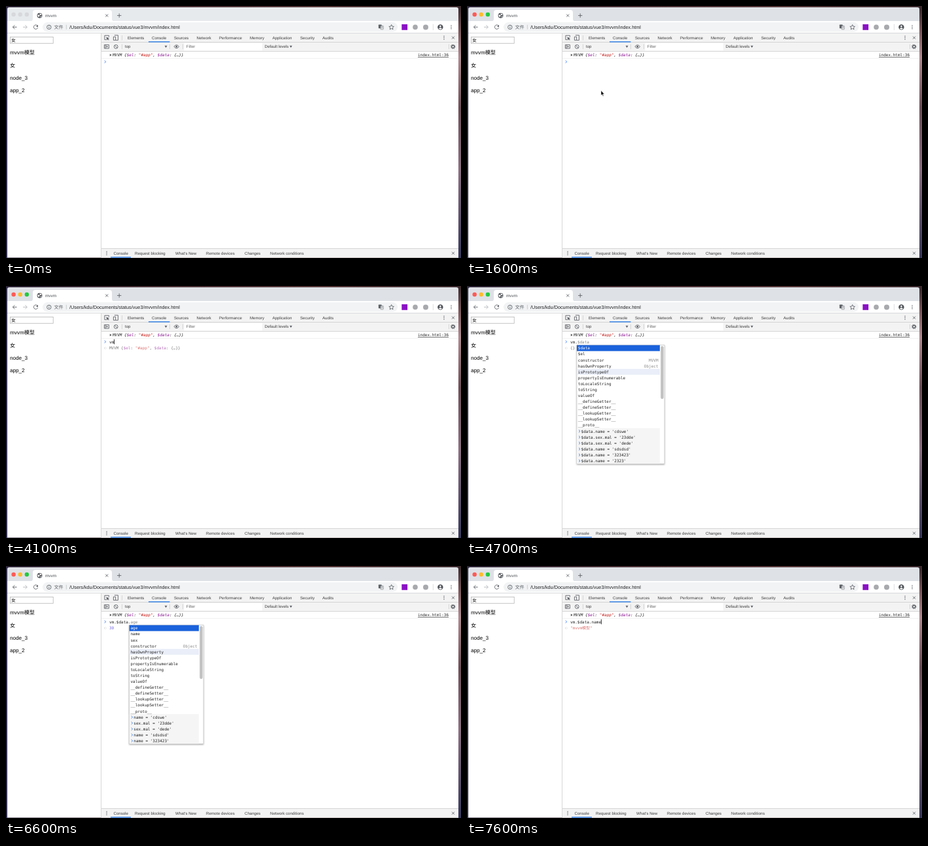
Write an HTML page that moves like this. It is 696 by 386 pixels and loops after 8000 ms.

```html
<!DOCTYPE html>
<html lang="en">
<head>
<meta charset="utf-8">
<title>mvvm</title>
<style>
html, body { margin: 0; width: 100%; height: 100%; overflow: hidden; background: #fff; }
svg { display: block; width: 696px; height: 386px; }
text { font-family: "Liberation Sans", "Noto Sans CJK SC", "Noto Sans CJK", sans-serif; text-rendering: geometricPrecision; white-space: pre; }
.ui text { font-size: 6.1px; fill: #3c3c3c; }
.code text { font-family: "DejaVu Sans Mono", "Noto Sans CJK SC", "Noto Sans CJK", monospace; font-size: 6.03px; fill: #222; }
.page text { font-size: 8.15px; fill: #000; }
.ime text { font-size: 6.1px; fill: #333; }
.line { fill: none; stroke: #5f6368; stroke-width: .9; }
.key { fill: #881391; }
.str { fill: #c41a16; }
.num { fill: #1c00cf; }
.window:not(.active) .strip { fill: #e7eaed; }
.window:not(.active) .light { fill: #d6d8dc; }
</style>
</head>
<body>
<svg viewBox="0 0 696 386">
  <defs>
    <linearGradient id="wallTop">
      <stop offset="0" stop-color="#2b2436"/><stop offset=".3" stop-color="#4a3238"/>
      <stop offset=".7" stop-color="#5a3a3c"/><stop offset="1" stop-color="#3b2a2e"/>
    </linearGradient>
    <linearGradient id="wallSide" x2="0" y2="1">
      <stop offset="0" stop-color="#3b2a2e"/><stop offset=".1" stop-color="#7d5a5e"/>
      <stop offset=".2" stop-color="#b08a90"/><stop offset=".4" stop-color="#6d4f58"/>
      <stop offset=".65" stop-color="#8a6f80"/><stop offset="1" stop-color="#38385a"/>
    </linearGradient>
    <filter id="shadow" x="-10%" y="-10%" width="120%" height="120%">
      <feDropShadow dx="0" dy="1" stdDeviation="1.3" flood-opacity=".4"/>
    </filter>
    <g id="dots" fill="#5f6368"><circle cy="-2.4" r=".75"/><circle r=".75"/><circle cy="2.4" r=".75"/></g>
    <path id="cross" class="line" d="M-2-2 2 2M2-2-2 2"/>
  </defs>

  <rect width="696" height="386" fill="url(#wallTop)"/>
  <rect y="2" width="3" height="384" fill="#33304e"/>
  <rect x="690" y="2" width="6" height="384" fill="url(#wallSide)"/>

  <g class="window" id="window">
    <path class="strip" fill="#dee1e6" d="M2 24V5q0-3 3-3H689q3 0 3 3V24z"/>
    <rect x="2" y="23" width="690" height="362.4" fill="#fff"/>
    <circle class="light" cx="11.6" cy="13" r="3.2" fill="#fc5b57"/>
    <circle class="light" cx="21.7" cy="13" r="3.2" fill="#fdbc2e"/>
    <circle class="light" cx="31.8" cy="13" r="3.2" fill="#28c840"/>
    <path fill="#fff" d="M37 23.5q4 0 4-4V10q0-4 4-4H158q4 0 4 4v9.5q0 4 4 4z"/>
    <circle cx="51.5" cy="14.6" r="3.9" fill="#4a4d51"/>
    <path fill="#fff" d="M48.5 13.2l2.4.4.9 1.5-1.2 1.1-.3 1.3-1.7-2zM51.5 11.4l2.2.7.8 1.8-1.8.2-1.3-.9zM53 15.4l1.6.2-.9 1.6-1.1.4z"/>
    <text x="60" y="17" font-size="6.4" fill="#45494d">mvvm</text>
    <use href="#cross" x="154.2" y="14.6"/>
    <path class="line" d="M170 14.6h6.4M173.2 11.4v6.4"/>

    <rect x="56" y="25" width="543" height="14.6" rx="7.3" fill="#f1f3f4"/>
    <path class="line" d="M16.6 32.3H10.4M13.3 29.3l-3 3 3 3"/>
    <path class="line" style="stroke:#b5b8bc" d="M26 32.3h6.2M29.3 29.3l3 3-3 3"/>
    <path class="line" d="M48.2 30.4a3.2 3.2 0 1 0 .4 2.8"/>
    <path fill="#5f6368" d="M49 28.8v3.1h-3.1z"/>
    <circle class="line" cx="65.8" cy="32.4" r="3.2"/>
    <path class="line" d="M65.8 31.9v2.2M65.8 30.3v.9"/>
    <text x="73.5" y="35" font-size="7.1" fill="#5f6368">文件</text>
    <path d="M92.3 28.8v7" stroke="#b8bbbf" stroke-width=".7"/>
    <text x="97" y="34.9" font-size="7.26" fill="#202124">/Users/kdu/Documents/status/vue3/mvvm/index.html</text>
    <rect x="569.8" y="28.6" width="4.8" height="5.6" rx=".6" fill="#5f6368"/>
    <rect x="573" y="30.4" width="4.2" height="5.4" rx=".6" fill="#fff" stroke="#5f6368" stroke-width=".6"/>
    <path d="M573.9 32h2.5M575.1 31.3v.7M576 32.1l-2 2.6M574.1 32.5l2.1 2.2" stroke="#5f6368" stroke-width=".5"/>
    <path class="line" stroke-width=".8" d="M589.6 28.6l1.1 2.5 2.7.3-2 1.8.6 2.7-2.4-1.4-2.4 1.4.6-2.7-2-1.8 2.7-.3z"/>
    <rect x="605.3" y="28" width="8.8" height="8.8" fill="#8a12c4"/>
    <circle cx="626" cy="32.4" r="3.8" fill="#a7a9ac"/>
    <circle cx="642" cy="32.4" r="4" fill="#a7a9ac"/>
    <path d="M653.4 27.6v9.4" stroke="#d0d2d5" stroke-width=".7"/>
    <circle cx="664.4" cy="32.4" r="4.2" fill="#4d5156"/>
    <circle cx="664.4" cy="31.1" r="1.3" fill="#fff"/>
    <path fill="#fff" d="M661.8 34.6q2.6-2.6 5.2 0-2.6 2.4-5.2 0z"/>
    <use href="#dots" x="681" y="32.4"/>
    <path d="M2 41.5h690" stroke="#cfd1d4" stroke-width=".8"/>

    <g class="page">
      <rect x="6.4" y="47.4" width="65.8" height="9.8" fill="#fff" stroke="#b4b4b4" stroke-width=".8"/>
      <text x="8" y="54.8" style="font-size:6.8px">女</text>
      <text x="6" y="74.3">mvvm模型</text>
      <text x="6" y="93.5">女</text>
      <text x="6" y="112.7">node_3</text>
      <text x="6" y="131.9">app_2</text>
    </g>

    <g class="ui" id="tools">
      <path fill="#f3f3f3" d="M146 42h546v27.5H146zM146 371.5h546v13.9H146z"/>
      <path fill="none" stroke="#cdcdcd" stroke-width=".8" d="M145.5 42v343.4M146 55.5h546M146 69.5h546M146 371.5h546M177.5 45v7.5M177.5 58.5v7.5M250.5 58.5v7.5M270.5 58.5v7.5M677.5 58.5v7.5"/>
      <path fill="#1a73e8" d="M218 54.2h32.5v1.2H218zM160 384.2h31v1.2h-31z"/>
      <path class="line" d="M157.4 47.5V45.2H150.9v6.4h2.6"/>
      <path fill="#5f6368" d="M153.3 47.4l4.8 1.8-2 .9 1.7 1.7-.8.8-1.7-1.7-.8 1.9z"/>
      <path class="line" d="M166 45V44.8h5.4v7.6h-3.8M164.4 47.2h3.2v5.2h-3.2z"/>
      <use href="#dots" x="670" y="48.6"/><use href="#cross" x="684" y="48.6"/>
      <path class="line" d="M150.4 59.4h7v5.6h-7zM152.2 59.4v5.6"/>
      <path fill="#5f6368" d="M153.6 60.6l2.6 1.6-2.6 1.6z"/>
      <circle class="line" cx="168.2" cy="62.3" r="2.9"/>
      <path class="line" d="M166.2 60.3l4 4"/>
      <text x="182" y="64.4">top</text>
      <path fill="#5f6368" d="M242.6 60.7h4l-2 3.2zM433.8 60.7h4l-2 3.2z"/>
      <path class="line" d="M256.9 62.2q3.9-5 7.8 0-3.9 5-7.8 0z"/>
      <circle cx="260.8" cy="62.2" r="1.4" fill="#5f6368"/>
      <rect x="272.5" y="57" width="119.5" height="11.2" fill="#fff"/>
      <text x="275.8" y="64.4" style="fill:#666">Filter</text>
      <text x="395.8" y="64.4">Default levels</text>
      <circle cx="683.8" cy="62.3" r="2" fill="none" stroke="#5f6368" stroke-width="1.4"/>
      <circle cx="683.8" cy="62.3" r="3.1" fill="none" stroke="#5f6368" stroke-width="1.1" stroke-dasharray="1.22"/>
      <use href="#dots" x="154" y="378.6"/><use href="#cross" x="684" y="378.6"/>
    </g>

    <g class="code">
      <path d="M146 80.3h546" stroke="#ececec" stroke-width=".8"/>
      <path fill="#555" d="M158.8 73.2l2.8 1.9-2.8 1.9z"/>
      <text x="163" y="77.3" font-style="italic">MVVM {<tspan class="key">$el</tspan>: <tspan class="str">"#app"</tspan>, <tspan class="key">$data</tspan>: {…}}</text>
      <text x="630" y="77" text-decoration="underline">index.html:36</text>
      <path fill="none" stroke="#367cf1" stroke-width=".9" d="M150.7 83.5l2 1.9-2 1.9"/>
      <text id="input" x="158" y="87.5"><tspan id="typed"></tspan><tspan id="hint" fill="#888"></tspan></text>
      <rect id="caret" y="81.6" width=".8" height="7.6" fill="#000"/>
      <g id="preview" opacity=".6">
        <path fill="none" stroke="#aaa" stroke-width=".8" d="M152 93.4l-1.6 1.7 1.6 1.7M153.2 95.1h.9"/>
        <text id="result" x="158" y="97.3"></text>
      </g>
      <g id="popup"></g>
    </g>

    <g class="ime" id="ime">
      <path d="M158 89.4h4" stroke="#000" stroke-width=".7"/>
      <rect x="160" y="93" width="138" height="78.4" rx="1.5" fill="#fff" stroke="#b9b9b9" stroke-width=".7" filter="url(#shadow)"/>
      <circle cx="290" cy="101" r="7" fill="#f8d3cf"/>
      <text x="165" y="106.4" style="font-size:8px">v</text>
      <path d="M169.3 97.3v11.6" stroke="#222" stroke-width=".8"/>
      <path d="M164 110.5h130" stroke="#eee" stroke-width=".7"/>
      <text x="165.5" y="118.4">. v+数字（如: v123）</text>
      <text x="165.5" y="128.9">. v+小数（如: v123.45）</text>
      <text x="165.5" y="139.4">. v+日期（如: v2013/1/1）</text>
      <text x="165.5" y="150.2">. v+算式（如: v1+1）</text>
      <text x="225.4" y="150.2" style="fill:#1b94e0" text-decoration="underline">查看函数列表</text>
      <text x="166" y="164.6" style="font-size:6.2px;fill:#999">数字/日期转中文，快速计算器就在V模式~</text>
    </g>

    <path id="mouse" fill="#000" stroke="#fff" stroke-width=".6" d="M0 0V7.6L1.7 6 2.9 8.8 4.1 8.3 2.9 5.6H5.2z"/>
  </g>
</svg>
<script>
const LOOP = 8000, CHAR = 3.63, ROW = 9.08;
const $ = id => document.getElementById(id);

function add(parent, tag, attrs, text = "") {
  const el = document.createElementNS("http://www.w3.org/2000/svg", tag);
  for (const k in attrs) el.setAttribute(k, attrs[k]);
  el.textContent = text;
  return parent.appendChild(el);
}

function labels(y, items) {
  for (const [x, name] of items) add($("tools"), "text", { x, y }, name);
}
labels(50.7, [[186, "Elements"], [223, "Console"], [257, "Sources"], [291.5, "Network"], [326, "Performance"],
  [373, "Memory"], [407.5, "Application"], [450, "Security"], [484, "Audits"]]);
labels(380.7, [[164.5, "Console"], [197, "Request blocking"], [259, "What's New"], [306, "Remote devices"],
  [365, "Changes"], [404, "Network conditions"]]);

const builtins = ["hasOwnProperty", "isPrototypeOf", "propertyIsEnumerable", "toLocaleString", "toString", "valueOf",
  ..."defineGetter defineSetter lookupGetter lookupSetter proto".split(" ").map(s => `__${s}__`)];
const past = ["name = 'cdswe'", "sex.mal = '23dde'", "sex.mal = 'dede'", "name = 'sdsdsd'", "name = '323423'"];
const lists = {
  vm: { x: 168, items: ["$data", "$el", "constructor", ...builtins],
        past: [...past, "name = '2323'"].map(s => "$data." + s), notes: { 2: "MVVM", 3: "Object" } },
  data: { x: 188.7, items: ["age", "name", "sex", "constructor", ...builtins], past, notes: { 3: "Object" } },
};

function drawPopup(name, selected) {
  const g = $("popup");
  g.replaceChildren();
  if (!name) return;
  const { x, items, past, notes } = lists[name];
  const top = 90.6, right = 302, width = right - x;
  const band = (i, n, fill) => add(g, "rect", { x, y: top + i * ROW, width: width - 7, height: n * ROW, fill });
  add(g, "rect", { x, y: top, width, height: 20 * ROW, fill: "#fff", stroke: "#bbb", "stroke-width": .6, filter: "url(#shadow)" });
  band(items.length, past.length, "#f5f5f5");
  band(4, 1, "#eaeef8");
  band(selected, 1, "#1a62dc");
  [...items, ...past].forEach((label, i) => {
    const y = top + i * ROW + 6.8, old = i >= items.length;
    add(g, "text", { x: x + (old ? 6.6 : 1.8), y, style: i === selected ? "fill:#fff" : "" }, label);
    if (old) add(g, "path", { d: `M${x + 3} ${y - 4}l2 1.9-2 1.9`, fill: "none", stroke: "#367cf1", "stroke-width": .9 });
    if (notes[i]) add(g, "text", { x: 292.6, y, "text-anchor": "end", style: "fill:#888" }, notes[i]);
  });
  add(g, "rect", { x: 296.3, y: 92, width: 4.4, height: 81, rx: 2.2, fill: "#c1c1c1" });
}

const results = {
  vm: 'MVVM {<tspan class="key">$el</tspan>: <tspan class="str">"#app"</tspan>, <tspan class="key">$data</tspan>: {…}}',
  empty: "{}",
  age: '<tspan class="num">30</tspan>',
  name: '<tspan class="str">"mvvm模型"</tspan>',
};

// Each step overrides the values set before it.
const steps = [
  [0, { typed: "", hint: "", caret: 0, result: "", popup: "", row: 0, ime: 0, active: 0 }],
  [400, { active: 1 }],
  [1700, { caret: 1 }],
  [2400, { caret: 0 }],
  [2900, { typed: "v", caret: 1, ime: 1 }],
  [3200, { ime: 0 }],
  [3600, { typed: "vm" }],
  [4100, { result: "vm" }],
  [4200, { typed: "vm." }],
  [4300, { hint: "$data", popup: "vm" }],
  [4400, { result: "empty" }],
  [4700, { caret: 0 }],
  [5000, { typed: "vm.$data", hint: "", popup: "", caret: 1 }],
  [5500, { caret: 0 }],
  [5800, { typed: "vm.$data.", caret: 1 }],
  [5900, { hint: "age", popup: "data" }],
  [6000, { result: "age" }],
  [6300, { caret: 0 }],
  [6800, { hint: "name", row: 1, result: "name" }],
  [7000, { typed: "vm.$data.name", hint: "", popup: "", caret: 1 }],
];

const show = (id, on) => { $(id).style.display = on ? "" : "none"; };

function apply(s) {
  $("window").classList.toggle("active", !!s.active);
  $("typed").textContent = s.typed;
  $("hint").textContent = s.hint;
  $("caret").setAttribute("x", 157.7 + s.typed.length * CHAR);
  $("result").innerHTML = results[s.result] || "";
  show("caret", s.caret);
  show("preview", s.result);
  show("ime", s.ime);
  drawPopup(s.popup, s.row);
}

const path = [[400, 250, 392], [900, 208, 175], [1200, 205.5, 130], [1500, 205.5, 130], [1600, 205, 129.4]];

function moveMouse(t) {
  const on = t >= 400 && t < 2900;
  show("mouse", on);
  if (!on) return;
  let i = 0;
  while (i < path.length - 2 && t >= path[i + 1][0]) i++;
  const [t0, x0, y0] = path[i], [t1, x1, y1] = path[i + 1];
  const p = Math.min(1, (t - t0) / (t1 - t0)), e = p * p * (3 - 2 * p);
  $("mouse").setAttribute("transform", `translate(${x0 + (x1 - x0) * e} ${y0 + (y1 - y0) * e})`);
}

const start = performance.now();
let current = -1;

function frame() {
  const t = (performance.now() - start) % LOOP;
  const n = steps.filter(([at]) => at <= t).length;
  if (n !== current) {
    current = n;
    apply(Object.assign({}, ...steps.slice(0, n).map(([, change]) => change)));
  }
  moveMouse(t);
  requestAnimationFrame(frame);
}
frame();
</script>
</body>
</html>
```
